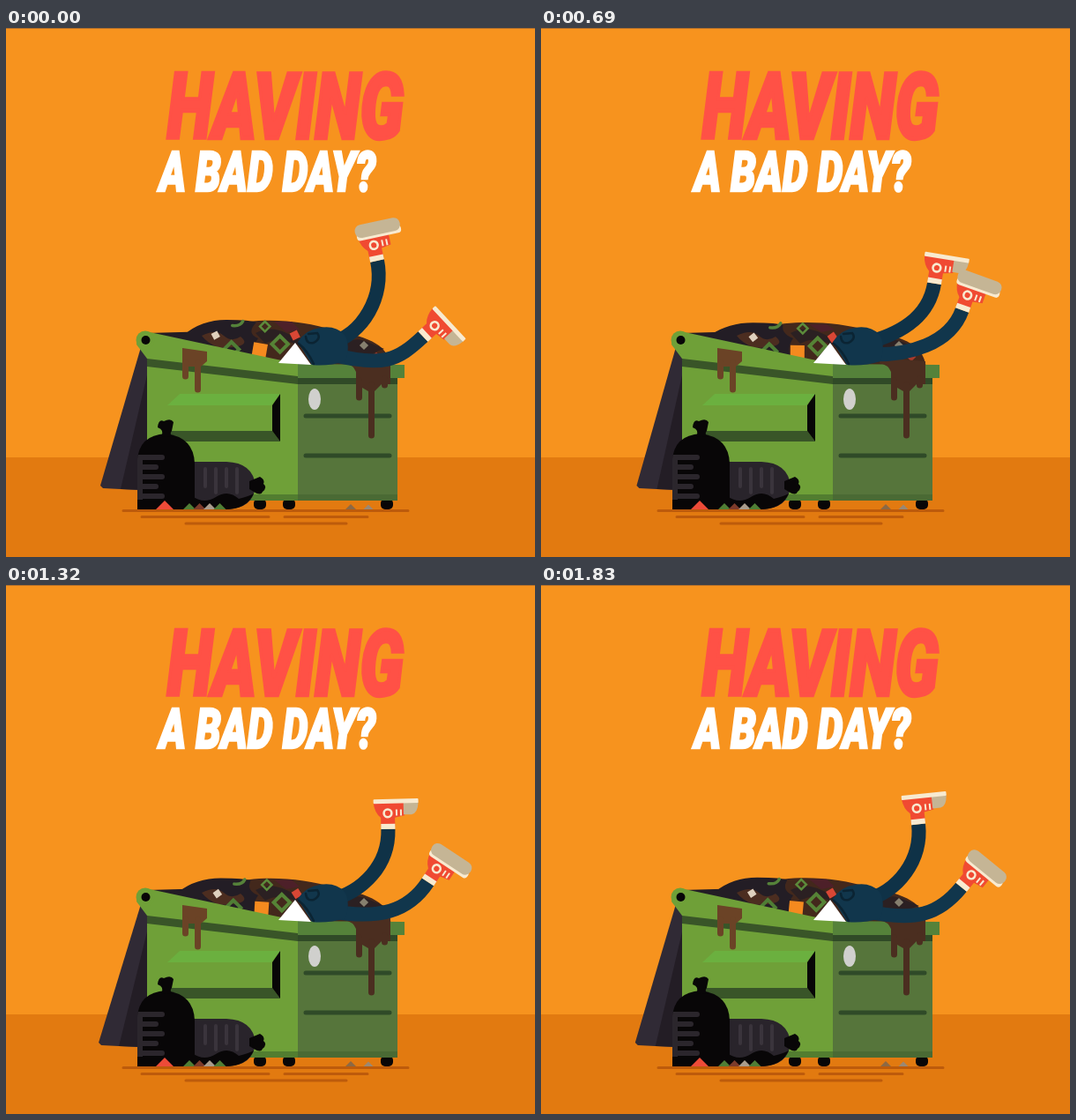
An HTML page with a canvas that plays this animation: 600x600 px, repeating every 1.86 s.

```html
<!DOCTYPE html>
<html lang="en">
<head>
<meta charset="utf-8">
<title>Having a bad day?</title>
<style>
html, body { margin: 0; width: 100%; height: 100%; overflow: hidden; background: #f7931e; }
canvas { display: block; width: 600px; height: 600px; }
</style>
</head>
<body>
<canvas id="stage" width="600" height="600" role="img" aria-label="Having a bad day?"></canvas>
<script>
const ctx = document.getElementById('stage').getContext('2d');
const LOOP = 1860, STEP = 30, KICKS = 7, TAU = 2 * Math.PI;
const C = {
  wall: '#f7931e', floor: '#e27a10', crack: '#bd5b0b',
  green: '#6fa038', side: '#56753b', lime: '#6bb03f', shade: '#395528',
  black: '#080607', coal: '#231d25', grey: '#2b262c', plum: '#302a35',
  mud: '#43281c', drip: '#6b4326', gravy: '#4b2e20',
  navy: '#11364c', ink: '#0b2433',
  red: '#f04a32', cream: '#f8ead0', sole: '#c5b595', orange: '#f58a1f'
};

const mix = (a, b, k) => a + (b - a) * k;
const rad = d => d * Math.PI / 180;

function poly(fill, ...p) {
  ctx.fillStyle = fill;
  ctx.beginPath();
  for (let i = 0; i < p.length; i += 2) ctx.lineTo(p[i], p[i + 1]);
  ctx.closePath();
  ctx.fill();
}

function shape(fill, d) {
  ctx.fillStyle = fill;
  ctx.fill(new Path2D(d));
}

function box(fill, x, y, w, h, r = 0) {
  ctx.fillStyle = fill;
  ctx.beginPath();
  ctx.roundRect(x, y, w, h, r);
  ctx.fill();
}

function oval(fill, x, y, rx, ry = rx) {
  ctx.fillStyle = fill;
  ctx.beginPath();
  ctx.ellipse(x, y, rx, ry, 0, 0, TAU);
  ctx.fill();
}

function line(color, width, d, cap = 'round') {
  ctx.strokeStyle = color;
  ctx.lineWidth = width;
  ctx.lineCap = cap;
  ctx.stroke(new Path2D(d));
}

function at(x, y, deg, draw) {
  ctx.save();
  ctx.translate(x, y);
  ctx.rotate(rad(deg));
  draw();
  ctx.restore();
}

function words(str, x, y, width, color) {
  const face = 'Roboto, "Open Sans", sans-serif';
  ctx.save();
  ctx.font = 'italic 900 100px ' + face;
  const size = 100 * width / ctx.measureText(str).width;
  ctx.font = `italic 900 ${size}px ${face}`;
  ctx.translate(x, y);
  ctx.scale(1, 1.39); // tall comic lettering
  ctx.fillStyle = ctx.strokeStyle = color;
  ctx.lineWidth = size / 24;
  ctx.lineJoin = 'miter';
  ctx.miterLimit = 3;
  ctx.fillText(str, 0, 0);
  ctx.strokeText(str, 0, 0);
  ctx.restore();
}

function backdrop() {
  box(C.wall, 0, 0, 600, 600);
  box(C.floor, 0, 487, 600, 113);
  box('#b5702a', 0, 0, 600, 1);
  line(C.crack, 3, 'M133 547.5H456M154 554.5H298M316 554.5H410M204 562H386');
  words('HAVING', 183, 125, 268, '#ff5146');
  words('A BAD DAY?', 174, 185, 245, '#fff');
}

function lid(x) {
  poly(C.plum, 153, 362, x, 519, x + 3, 522, x + 43, 524, 162, 524, 162, 362);
  poly(C.coal, 162, 385, x + 23, 523, 162, 524);
}

function gem(color, x, y, r, ring, deg = 45) {
  at(x, y, deg, () => {
    if (ring) {
      ctx.strokeStyle = color;
      ctx.lineWidth = ring;
      ctx.strokeRect(-r, -r, 2 * r, 2 * r);
    } else box(color, -r, -r, 2 * r, 2 * r);
  });
}

function heap(top, w) {
  const l = mix(192, 204, w);
  poly(C.coal, 160, 346, 235, 344, 300, 382, 160, 370);
  shape(C.mud, `M214 358C246 ${top - 5} 320 ${top - 5} 372 343
    C404 350 434 355 437 386H300Z`);
  shape(C.coal, `M${l} 348Q${l + 20} ${top} ${l + 48} ${top}T${l + 82} ${top + 3}
    Q272 346 286 352Q277 364 286 378L205 358Z`);
  shape('#4c2d20', 'M222 349Q238 341 247 349T266 350Q276 358 263 361T240 362Q228 357 222 349Z');
  shape('#2b2022', 'M283 346Q300 337 318 346T341 351L329 359Q310 349 294 358Z');
  shape('#2b2022', 'M383 360Q394 350 407 355T429 364Q420 366 414 371T383 370Z');
  poly('#4d2029', 304, top + 2, 324, top + 2, 333, 342, 318, 345);
  gem('#86806f', 406, 360, 3.6);
  gem('#a83a2c', 420, 373, 3.8);
  // loose scraps tumble together
  at(-4 * w, -3 * w, 0, () => {
    const tilt = 12 * w;
    line('#55823a', 3.5, 'M260 340q9 1 12 -5');
    gem('#dfd0bd', 241, 351, 3.8, 0, 52 + tilt);
    gem('#4f7e35', 259, 367, 6, 4);
    gem('#5c8b3b', 297, 341, 4, 2.5);
    gem('#568336', 314, 361, 6.5, 4);
    gem(C.orange, 291, 368, 8, 0, tilt);
    gem('#d94735', 331, 351, 4.5, 0, 54 + tilt);
  });
}

function bin() {
  for (const x of [281, 314, 425]) box(C.black, x, 534, 14, 12, 5);
  // walls
  poly(C.green, 160, 370, 331, 388, 331, 536, 160, 536);
  box(C.side, 331, 388, 113, 148);
  box('#527d30', 160, 529, 171, 7);
  box('#4a6a34', 331, 529, 113, 7);
  poly(C.shade, 160, 374, 331, 393, 331, 404, 160, 384);
  box('#304a27', 331, 396, 113, 8);
  // rim and hinge
  poly(C.green, 150, 347, 163, 345, 331, 381, 331, 395, 160, 375, 148, 359);
  poly('#55823a', 331, 381, 452, 382, 452, 397, 331, 397);
  oval(C.green, 158, 354, 10.5);
  oval(C.black, 158.5, 354, 5);
  // front panel
  poly(C.lime, 197, 415, 311, 415, 301, 428, 183, 428);
  poly(C.shade, 183, 457, 302, 457, 311, 469, 188, 469);
  poly(C.black, 311, 415, 311, 469, 302, 457, 302, 428);
  // side details
  oval('#d0d0cd', 350, 421, 7, 12);
  line('#2f4a28', 5, 'M340 440H435M340 485H435');
}

function spills() {
  poly(C.drip, 200, 363, 228, 367, 228, 378, 221, 384, 200, 384);
  line(C.drip, 7, 'M203.5 380V395M217.5 380V410');
  shape(C.gravy, 'M384 374L436 378V404H426L418 412H411L404 408H397V390Q394 382 384 380Z');
  line(C.gravy, 7, 'M400.5 400V419M414.5 405V462M429.5 398V405');
}

function bags() {
  // lying bag
  shape('#29242b', 'M210 492H250Q280 493 283 519Q281 545 250 546H210Z');
  shape(C.black, 'M210 530Q224 541 238 532T264 534Q276 531 281 528Q273 546 248 546H210Z');
  for (let i = 0; i < 4; i++) line('#3a343c', 4, `M${226 + 12 * i} 500v${i % 2 ? 27 : 20}`);
  shape(C.black, 'M276 514L288 509Q294 512 292 517Q297 521 291 526Q289 531 281 526L276 523Z');
  // standing bag
  const sack = 'M149 546V490Q151 462 181 460Q213 464 214 494V546Z';
  shape(C.black, sack);
  shape(C.black, 'M176 463Q180 456 172 453Q173 443 179 446Q187 442 190 447L188 457Q185 460 189 464Z');
  ctx.save();
  ctx.clip(new Path2D(sack));
  box(C.grey, 149, 485, 6, 50);
  for (let i = 0; i < 5; i++) line(C.grey, 6, `M150 ${487 + 11 * i}h${i % 2 ? 20 : 27}`);
  ctx.restore();
}

function litter() {
  const tri = (color, x, r) => poly(color, x - r, 546, x, 546 - r, x + r, 546);
  tri('#ed4b38', 180, 10);
  ['#4f7e35', '#7d3b2b', '#a99c8c', '#4f7e35'].forEach((c, i) => tri(c, 208 + 11.5 * i, 7));
  tri('#8c6945', 391, 6);
  tri('#9a8874', 411, 5.5);
}

function shoe(x, y, deg, under) {
  at(x, y, deg, () => {
    box(C.red, -8, -20, 16, 17);
    box(C.cream, -8, -6, 16, 6);
    shape(C.red, 'M-16 -30H19V-15L8 -13H-8Q-15 -19 -16 -30Z');
    if (under) {
      box(C.cream, -17, -35, 51, 9, 4);
      box(C.sole, -18, -44, 52, 15, 7);
    } else {
      shape(C.sole, 'M18 -30H35Q34 -17 27 -16H18Z');
      box(C.cream, -16, -34, 51, 5, 1);
    }
    ctx.strokeStyle = C.cream;
    ctx.lineWidth = 2.6;
    ctx.beginPath();
    ctx.arc(0, -18, 4.4, 0, TAU);
    ctx.stroke();
    line(C.cream, 2, 'M10 -22V-15M15 -22V-15', 'butt');
  });
}

function leg(color, start, x, y, deg, under) {
  const a = rad(deg), reach = 40;
  const kx = x - reach * Math.sin(a), ky = y + reach * Math.cos(a);
  line(color, 16, `M${start} ${kx} ${ky} ${x} ${y}`, 'butt');
  shoe(x, y, deg, under);
}

// h: how far the rear leg is lifted, 0 to 1; the front leg does the opposite.
function person(h, rising) {
  const k = h ** 1.5;
  poly('#fff', 328, 357, 346, 382, 309, 380);
  leg('#0f3247', '366 358C406 348',
    mix(453, 421, k), mix(297, 264, k), mix(15, -12, k), !rising);
  leg(C.navy, `368 370C${mix(412, 428, h)} ${mix(366, 385, h)}`,
    mix(468, 473, h) + 34 * h * (1 - h), mix(303, 350, h), mix(12, 47, k), rising);
  shape(C.navy, 'M331 356Q340 342 356 340Q374 337 384 348Q391 360 385 378Q365 384 347 382Z');
  line(C.ink, 2.5, 'M332 358Q342 366 349 381');
  line(C.ink, 2.5, 'M340 350Q341 359 349 357Q358 352 353 346L343 347');
}

function render(u) {
  const sway = Math.sin(TAU * u);
  const kick = TAU * (.5 + KICKS * u + .15 * sway);
  const lift = (1 - Math.cos(kick)) / 2;
  const drive = Math.sin(kick + .11 * TAU); // feet turn a little before the legs do
  backdrop();
  lid(107 + 2 * sway);
  heap(336 - 5 * lift, (1 - drive) / 2);
  bin();
  spills();
  bags();
  litter();
  person(lift, drive > 0);
}

const start = performance.now();
function tick() {
  const t = (performance.now() - start) % LOOP;
  render(Math.floor(t / STEP) * STEP / LOOP);
  requestAnimationFrame(tick);
}
tick();
</script>
</body>
</html>
```
